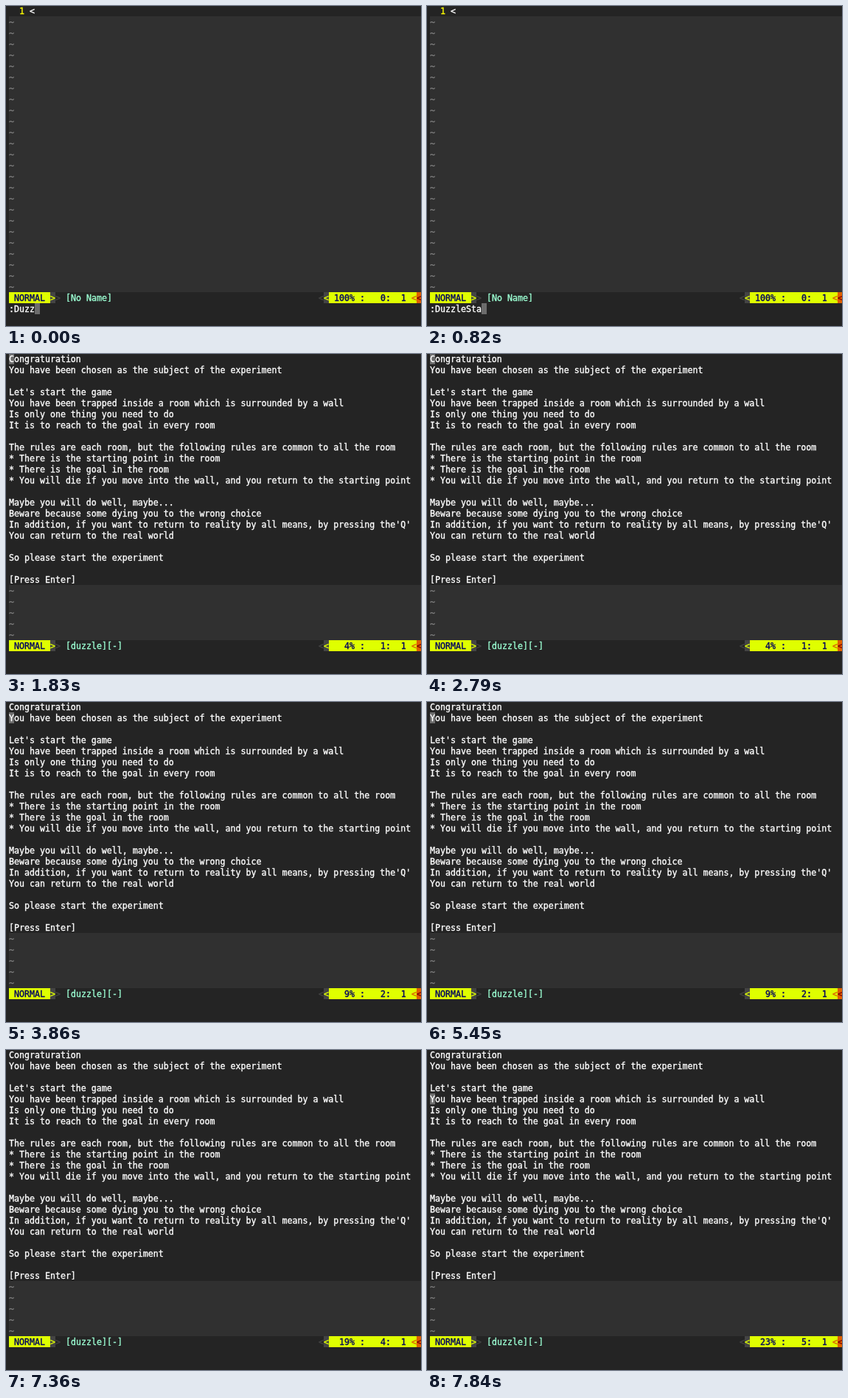
Recreate the animation shown at these times as an HTML page. Size 563 px wide and 435 px high, loop 8000 ms.

```html
<!DOCTYPE html>
<html lang="en">
<head>
<meta charset="utf-8">
<title>Terminal game intro</title>
<style>
html, body { margin: 0; width: 100%; height: 100%; overflow: hidden; background: #242424; }
#screen { position: relative; width: 563px; height: 435px; overflow: hidden; background: #242424;
  font: 11.627px/17px "DejaVu Sans Mono", monospace; font-variant-ligatures: none; }
#screen div { position: absolute; height: 15px; white-space: pre; -webkit-text-stroke: 0.35px; }
</style>
</head>
<body>
<div id="screen"></div>
<script>
const LOOP = 8000, CW = 7, RH = 15, COLS = 80, STATUS = 26, PROMPT = 27;
const LIME = '#dfff00', NAVY = '#00005f', GREY = '#444', CURSOR = '#6c6c6c', ORANGE = '#df5f00';
const COMMAND = ':DuzzleStart';
const STORY = `Congraturation
You have been chosen as the subject of the experiment

Let's start the game
You have been trapped inside a room which is surrounded by a wall
Is only one thing you need to do
It is to reach to the goal in every room

The rules are each room, but the following rules are common to all the room
* There is the starting point in the room
* There is the goal in the room
* You will die if you move into the wall, and you return to the starting point

Maybe you will do well, maybe...
Beware because some dying you to the wrong choice
In addition, if you want to return to reality by all means, by pressing the'Q'
You can return to the real world

So please start the experiment

[Press Enter]`.split('\n');

// [time, value] steps
const TYPED = [[0, 5], [60, 6], [170, 7], [470, 8], [820, 10], [1000, 11], [1170, 12]];
const ENTER = 1710, START = 1830;
const LINE = [[START, 1], [3860, 2], [6280, 3], [6700, 4], [7840, 5]];
const HIDDEN = [[2550, 2790], [3210, 3450], [4520, 4820], [5180, 5450], [5870, 6100], [7360, 7660]];

const screen = document.getElementById('screen');
const stepAt = (steps, t) => steps.filter(s => s[0] <= t).pop()[1];

function put(row, col, text, color = '#fff', bg = 'none', cells = text.length) {
  const el = document.createElement('div');
  el.textContent = text;
  el.style.cssText = `left:${4 + col * CW}px;top:${row * RH - 1}px;width:${cells * CW}px;color:${color};background:${bg}`;
  screen.append(el);
}

function tildes(from) {
  for (let row = from; row < STATUS; row++) put(row, 0, '~', '#808080', '#303030', COLS);
}

function statusBar(name, percent, line) {
  put(STATUS, 0, ' NORMAL ', NAVY, LIME);
  put(STATUS, 8, '>', LIME, GREY);
  put(STATUS, 9, '>', GREY);
  put(STATUS, 11, name, '#9cffd3');
  put(STATUS, 60, '<', GREY);
  put(STATUS, 61, '<', LIME, GREY);
  put(STATUS, 62, ` ${String(percent).padStart(3)}% :${String(line).padStart(4)}:  1 `, NAVY, LIME);
  put(STATUS, 78, '<', ORANGE, LIME);
  put(STATUS, 79, '<', '#800000', ORANGE);
}

function drawPrompt(typed, entered) {
  put(0, 2, '1', '#ffff00');
  put(0, 4, '<');
  tildes(1);
  statusBar('[No Name]', 100, 0);
  put(PROMPT, entered ? 0 : typed, ' ', '#fff', CURSOR);
  put(PROMPT, 0, COMMAND.slice(0, typed));
}

function drawStory(line, cursorOn) {
  if (cursorOn) put(line - 1, 0, ' ', '#fff', CURSOR);
  STORY.forEach((text, row) => put(row, 0, text));
  tildes(STORY.length);
  statusBar('[duzzle][-]', Math.floor(100 * line / STORY.length), line);
}

let shown;
function frame(now) {
  const t = now % LOOP;
  const story = t >= START;
  const value = story ? stepAt(LINE, t) : stepAt(TYPED, t);
  const flag = story ? !HIDDEN.some(([a, b]) => t >= a && t < b) : t >= ENTER;
  const key = [story, value, flag].join();
  if (key !== shown) {
    shown = key;
    screen.replaceChildren();
    (story ? drawStory : drawPrompt)(value, flag);
  }
  requestAnimationFrame(frame);
}
frame(performance.now());
</script>
</body>
</html>
```
